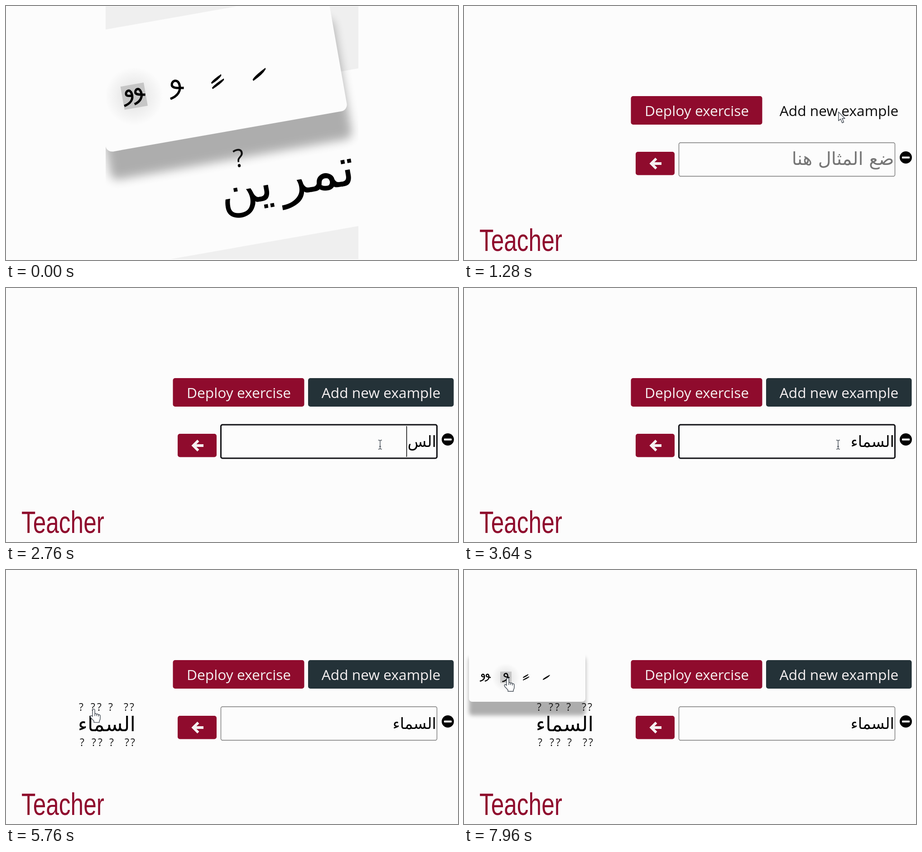
An HTML page for the animation above (8 s loop, 998 by 561 pixels).

```html
<!DOCTYPE html>
<html lang="en">
<head>
<meta charset="utf-8">
<title>Vowel sign exercise</title>
<style>
  html, body { margin: 0; height: 100%; overflow: hidden; background: #fcfcfc; }
  svg { display: block; width: 100vw; height: 100vh; }
  text { font-family: "Open Sans", sans-serif; white-space: pre; }
  .ar { font-family: "DejaVu Sans", sans-serif; text-anchor: end; }
  .btn { font-size: 31.7px; text-anchor: middle; }
  .q { font-size: 23px; text-anchor: middle; fill: #151515; }
  .sign { fill: none; stroke: #000; stroke-width: 2.5; }
</style>
</head>
<body>
<svg viewBox="0 0 998 561">
  <defs>
    <filter id="soft" x="-20%" y="-20%" width="140%" height="140%"><feGaussianBlur stdDeviation="5"/></filter>
    <radialGradient id="halo">
      <stop offset=".4" stop-opacity=".07"/><stop offset="1" stop-opacity="0"/>
    </radialGradient>
    <clipPath id="crop"><path d="M220 1H778V559H220z"/></clipPath>
    <clipPath id="wordCrop"><path d="M220 1H765V559H220z"/></clipPath>
    <path id="fatha" d="M-7.500 4.500Q-5 1 8-5.500L8-4Q4 1-7 6z"/>
    <g id="tanwin">
      <path d="M-7 0Q-4-3 5-7L5-5.500Q2-2-6.500 1.500z"/>
      <path d="M-7 5.500Q-3 2 7-2L7-.500Q3 3-6.500 7z"/>
    </g>
    <path id="damma" class="sign" d="M-8 9.500C0 8 5 3 4-4C3-11-4-9-4-4.500C-4-1 2-.500 8 .500"/>
    <g id="dammatan">
      <path class="sign" d="M-12 8.500C-5 7-1 3-2-3C-3-9-8-7-8-3.500C-8-1-4-1-2-1"/>
      <path class="sign" d="M-1 8.500C5 7 9 3 8-3C7-9 2-7 2-3.500C2-1 7-.500 12 .500"/>
    </g>
  </defs>

  <rect width="998" height="561" fill="#fcfcfc"/>
  <text transform="translate(34 541) scale(.745 1)" font-size="69" fill="#8f0b2d"
        style="font-family:'Liberation Sans',Arial,sans-serif">Teacher</text>
  <rect x="368.500" y="199" width="290" height="63" rx="5" fill="#8f0b2d"/>
  <text class="btn" x="514" y="243" fill="#f5f0f1">Deploy exercise</text>
  <rect id="addBox" x="667" y="199" width="321.500" height="63" rx="5" fill="#243238"/>
  <text id="addText" class="btn" x="828" y="243">Add new example</text>

  <g id="row">
    <rect id="goBox" x="379" y="322" width="86" height="51.500" rx="5" fill="#8f0b2d"/>
    <path id="goArrow" d="M424.500 337L413.500 348L424.500 359M413 348H436" fill="none" stroke-width="5.8"/>
    <rect id="field" x="474.500" y="302" width="477" height="74" rx="3.500" fill="#fcfcfc"/>
    <text id="hint" class="ar" x="949.500" y="351" font-size="40" fill="#757575">ضع المثال هنا</text>
    <text id="typed" class="ar" x="950" y="351" font-size="34"></text>
    <rect id="caret" y="305" width="1.500" height="68"/>
    <circle cx="975.500" cy="334.500" r="13.500"/>
    <rect x="967" y="332.500" width="17" height="4.200" rx="1" fill="#fcfcfc"/>
  </g>

  <g id="menu"></g>
  <g id="result"><text class="ar" x="286" y="356" font-size="45">السماء</text></g>

  <g id="pointer" fill="#fff" stroke="#434b55" stroke-width="1.400" stroke-linejoin="round">
    <path id="arrow" d="M0 0V19.500L4.500 15.500L8 24L11.500 22.500L8 14.500H14z"/>
    <path id="beam" fill="none" d="M-4-10Q0-10 0-8Q0-10 4-10M0-8V8M-4 10Q0 10 0 8Q0 10 4 10M-2 4H2"/>
    <path id="hand" d="M-2 16V2.500Q-2-.5 .5-.5T3 2.500V10Q5 8.500 7 11Q9.500 9.500 11 12Q15 11.500 15 15V20Q15 23 13 26V29H1V26L-6 18.500Q-8 15-5 14Q-3 14-2 16zM3 10V15M7 11V15M11 12V16"/>
  </g>

  <g id="intro">
    <rect width="998" height="561" fill="#fcfcfc"/>
    <g clip-path="url(#crop)">
      <rect width="998" height="561" fill="#efefef"/>
      <rect transform="translate(778 486) rotate(-10)" x="-700" y="-343" width="800" height="343" fill="#fcfcfc"/>
      <g id="bigMenu" transform="translate(755 230) rotate(-10) scale(2.080)"></g>
      <text transform="translate(506 357) rotate(-10)" font-size="55" fill="#111">?</text>
      <g clip-path="url(#wordCrop)">
        <text class="ar" transform="translate(775 393) rotate(-10)" font-size="118">تمر</text>
      </g>
      <text class="ar" transform="translate(594 426) rotate(-10)" font-size="114">ين</text>
    </g>
  </g>
</svg>
<script>
const $ = id => document.getElementById(id);
const set = (id, attrs) => { for (const k in attrs) $(id).setAttribute(k, attrs[k]); };
const show = (id, on) => set(id, { opacity: +on });
const ramp = (t, start, length) => Math.min(1, Math.max(0, (t - start) / length));
const mix = (a, b, p) => a + (b - a) * p;
const smooth = u => u * u * (3 - 2 * u);
const easeOut = u => 1 - (1 - u) ** 3;
const gray = p => `rgb(${[245, 240, 241].map(c => Math.round(mix(c, 12, p)))})`;

// Menu of vowel signs, with its bottom right corner at 0,0
const signs = { fatha: -86.5, tanwin: -131, damma: -175.5, dammatan: -221 };
function menu(id, width, lit) {
  const box = `x="${-width}" width="${width}" height="129" rx="7"`;
  const x = signs[lit];
  $(id).innerHTML = `<rect ${box} y="-99" opacity=".31" filter="url(#soft)"/>
    <rect ${box} y="-129" fill="#fcfcfc"/>
    <g id="${id}Lit"><circle cx="${x}" cy="-54" r="31" fill="url(#halo)"/>
    <rect x="${x - 12.5}" y="-66.500" width="25" height="25" fill="#c6c6c6"/></g>` +
    Object.keys(signs).map(s => `<use href="#${s}" x="${signs[s]}" y="-54"/>`).join('');
}
menu('bigMenu', 260, 'dammatan');
menu('menu', 257, 'damma');
set('menu', { transform: 'translate(268 291)' });

$('result').innerHTML += [166, 192, 206, 231, 265, 278].map((x, i) =>
  `<text class="q" x="${x}" y="311">?</text><text class="q" x="${x + 2}" y="389">?</text>`).join('');

// Pointer moves: start, end, target x, target y, easing
const moves = [
  [1760, 2120, 826, 346, smooth],
  [3840, 4440, 419, 354, smooth],
  [5200, 6320, 161, 301, easeOut],
  [7200, 7960, 96, 239, smooth]
];
const typing = [[2600, 'ا'], [2760, 'الس'], [3000, 'السما'], [3160, 'السماء']];

function movePointer(t) {
  let x = 827, y = 234;
  for (const [a, b, tx, ty, ease] of moves) {
    const p = ease(ramp(t, a, b - a));
    x = mix(x, tx, p);
    y = mix(y, ty, p);
  }
  const beam = x > 474 && y > 302, hand = x < 215;
  set('pointer', { transform: `translate(${x} ${y})` });
  show('beam', beam);
  show('hand', hand);
  show('arrow', !beam && !hand);
  show('menuLit', x < 105 && y < 251);
}

function draw(t) {
  show('intro', 1 - ramp(t, 170, 550));
  show('row', t >= 1280);

  const add = 1 - ramp(t, 1870, 150);
  show('addBox', 1 - add);
  set('addText', { fill: gray(add) });

  const go = ramp(t, 4300, 130) - ramp(t, 5260, 150);
  show('goBox', 1 - go);
  set('goArrow', { stroke: gray(go) });

  const focus = t >= 2160 && t < 4680;
  set('field', { stroke: focus ? '#101014' : '#777', 'stroke-width': focus ? 3 : 1.4 });
  show('hint', t < 2600);
  $('typed').textContent = typing.reduce((s, [at, word]) => t >= at ? word : s, '');
  set('caret', { x: 947 - $('typed').getComputedTextLength() });
  show('caret', focus && !(t >= 3640 && t < 4160));

  show('result', t >= 4680);
  show('menu', ramp(t, 6880, 160));
  movePointer(t);
}

function tick() {
  draw(performance.now() % 8000);
  requestAnimationFrame(tick);
}
tick();
</script>
</body>
</html>
```
